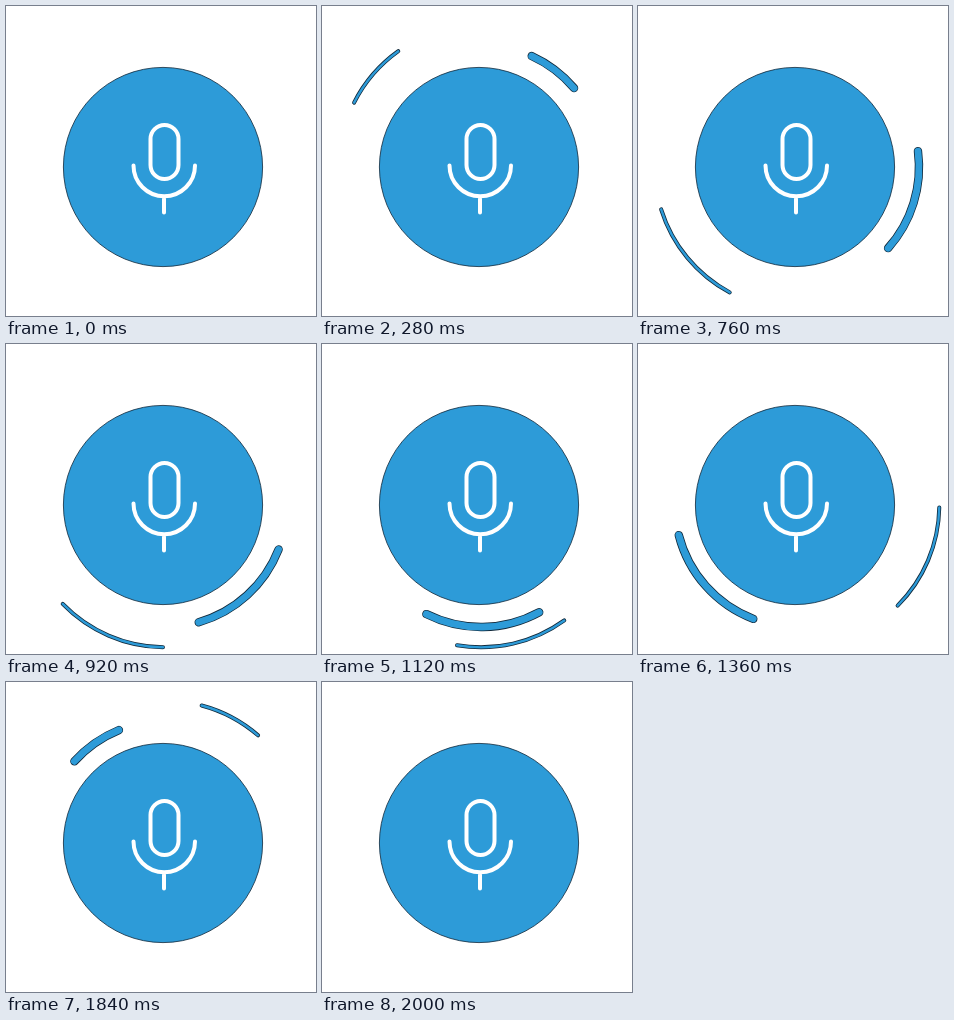
Write an HTML page that moves like this. It is 310 px wide and 310 px high and loops after 2.04 s.

```html
<!DOCTYPE html>
<html lang="en">
<head>
<meta charset="utf-8">
<title>Listening</title>
<style>
  html, body { margin: 0; width: 100%; height: 100%; overflow: hidden; background: #fff; }
  svg { display: block; width: 310px; height: 310px; }
  path, rect { fill: none; stroke-linecap: round; }
  .blue { stroke: #2d9bd8; }
  .edge { stroke: #10283a; }
  .mic { stroke: #fff; stroke-width: 4; }
</style>
</head>
<body>
<svg viewBox="0 0 310 310">
  <circle cx="157" cy="161" r="99.6" fill="#2d9bd8" stroke="#10283a" stroke-width=".8"/>
  <g class="mic">
    <rect x="144.5" y="119" width="28" height="54" rx="14"/>
    <path d="M127.5 159.5A30.75 30.75 0 0 0 189 159.5M158 190.5V206.5"/>
  </g>
  <g id="inner"><path class="edge" stroke-width="8.4"/><path class="blue" stroke-width="6.8"/></g>
  <g id="outer"><path class="edge" stroke-width="4"/><path class="blue" stroke-width="2.4"/></g>
</svg>
<script>
const LOOP = 2040, STEP = 40;
const times = [0, 520, 760, 1120, 1360, 1680, 2000];

// Angles in degrees, measured from the top along the direction of travel.
const arcs = [
  { id: 'inner', r: 122, dir: 1,
    tail: [0, 49, 82.5, 151.5, 201, 269, 360],
    head: [0, 91.5, 131.7, 206.6, 255.7, 313.7, 360] },
  { id: 'outer', r: 142.3, dir: -1,
    tail: [0, 68.5, 107.3, 170.3, 225, 282.6, 360],
    head: [0, 112, 151.8, 215.8, 269, 326.8, 360] }
];

const rate = (v, i) => (v[i + 1] - v[i]) / (times[i + 1] - times[i]);

function slope(v, i) {
  const last = times.length - 1;
  if (i === 0) return 1.5 * rate(v, 0) - 0.5 * slope(v, 1);
  if (i === last) return 1.5 * rate(v, last - 1) - 0.5 * slope(v, last - 1);
  const a = rate(v, i - 1), b = rate(v, i);
  return 2 * a * b / (a + b);
}

// Smooth cubic curve through the key angles
function angleAt(v, t) {
  let i = 0;
  while (i < times.length - 2 && t >= times[i + 1]) i++;
  const d = times[i + 1] - times[i], u = (t - times[i]) / d, w = 1 - u;
  return v[i] * w * w * (1 + 2 * u) + v[i + 1] * u * u * (3 - 2 * u)
    + d * u * w * (slope(v, i) * w - slope(v, i + 1) * u);
}

function point(r, deg) {
  const a = deg * Math.PI / 180;
  return (159 + r * Math.sin(a)).toFixed(2) + ' ' + (161 - r * Math.cos(a)).toFixed(2);
}

function draw(now) {
  const t = Math.floor(now % LOOP / STEP) * STEP;
  for (const { id, r, dir, tail, head } of arcs) {
    const from = angleAt(tail, t), to = angleAt(head, t);
    const d = t > 0 && t < 2000
      ? `M${point(r, dir * from)}A${r} ${r} 0 0 ${dir > 0 ? 1 : 0} ${point(r, dir * to)}` : '';
    for (const path of document.getElementById(id).children) path.setAttribute('d', d);
  }
}

const start = performance.now();
function frame() {
  draw(performance.now() - start);
  requestAnimationFrame(frame);
}
frame();
</script>
</body>
</html>
```
